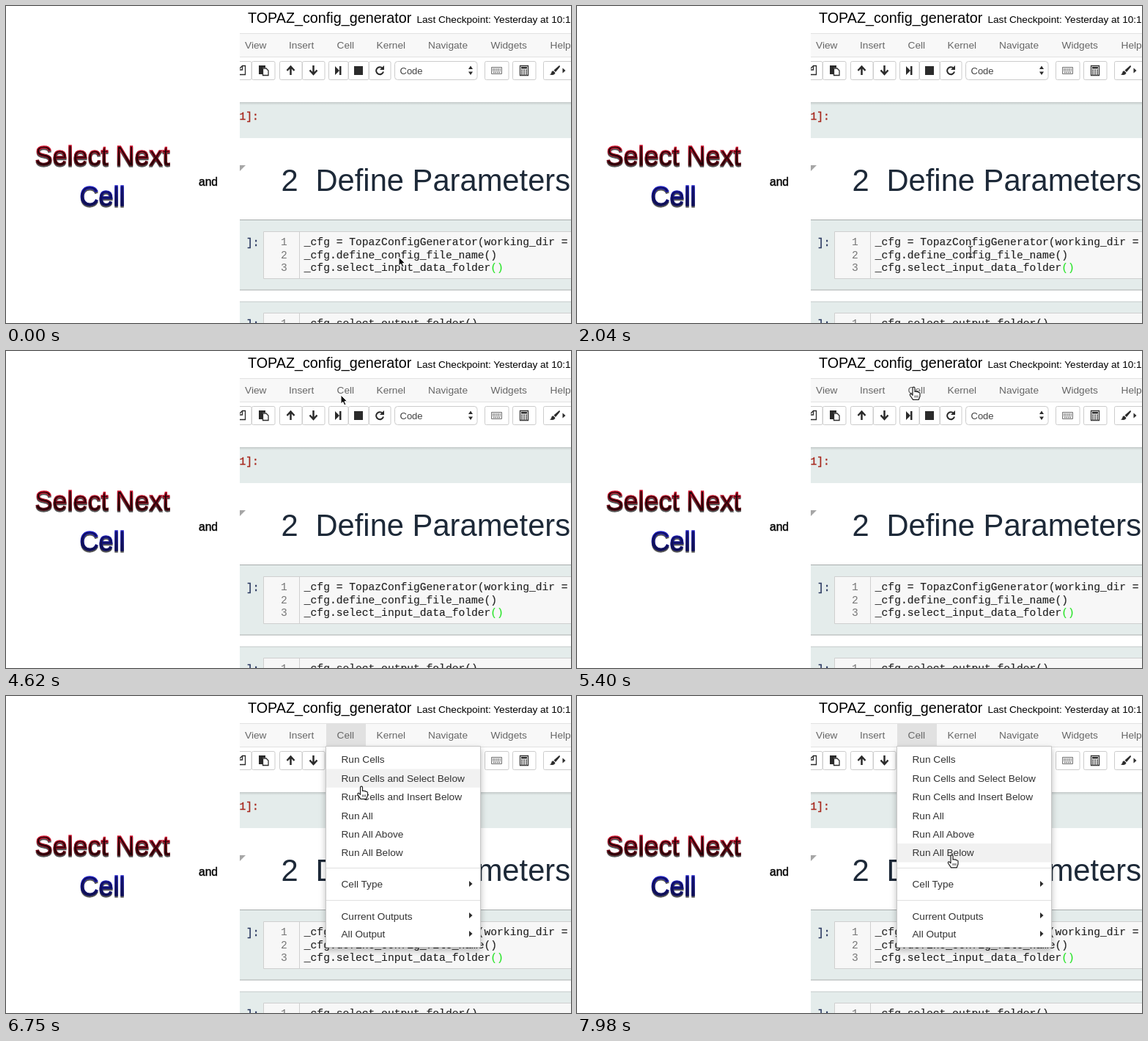
An HTML page for the animation above (8000 ms loop, 771 px wide and 432 px high).

```html
<!DOCTYPE html>
<html lang="en">
<head>
<meta charset="utf-8">
<title>Notebook cell menu</title>
<style>
html, body { margin: 0; width: 100%; height: 100%; overflow: hidden; background: #fff; }
svg { display: block; }
text { font-family: "Liberation Sans", Arial, sans-serif; white-space: pre; }
.mono text { font: 14.64px "Liberation Mono", monospace; fill: #222; stroke: #222; stroke-width: .15; }
.mono .num { fill: #777; stroke: none; }
.mono .red { fill: #a8281e; stroke: #a8281e; stroke-width: .3; }
.mono .prompt { fill: #2a3860; stroke: #2a3860; stroke-width: .4; }
.paren { fill: #2be52b; stroke: #2be52b; }
.bar text { font-size: 13.7px; fill: #666; }
.menu text { font-size: 13.65px; fill: #333; }
.button { fill: #fff; stroke: #ccc; }
.icon { fill: #2b2b2b; }
.line { fill: none; stroke: #2b2b2b; stroke-width: 2; }
.big { font-size: 36px; stroke-width: 1.3; filter: drop-shadow(.5px 2px .6px #000a); }
.pointer { stroke-linejoin: round; }
</style>
</head>
<body>
<svg width="771" height="432" viewBox="0 0 771 432">
  <defs>
    <linearGradient id="shade" x2="0" y2="1">
      <stop stop-color="#c3c9c9"/><stop offset="1" stop-color="#e4eceb"/>
    </linearGradient>
    <linearGradient id="red" x2="0" y2="1">
      <stop offset=".2" stop-color="#d0102c"/><stop offset=".85" stop-color="#400008"/>
    </linearGradient>
    <linearGradient id="blue" x2="0" y2="1">
      <stop offset=".2" stop-color="#1c1cc0"/><stop offset=".85" stop-color="#0c0c58"/>
    </linearGradient>
    <clipPath id="panel"><path d="M319 0H771V432H319Z"/></clipPath>
  </defs>

  <text class="big" x="39.500" y="216.500" fill="#1a0508" stroke="url(#red)">Select Next</text>
  <text class="big" x="100.500" y="271.500" fill="#10104e" stroke="url(#blue)">Cell</text>
  <text x="263" y="245" font-size="15.600" stroke="#000" stroke-width=".4">and</text>

  <g clip-path="url(#panel)">
    <path fill="#e4eceb" d="M319 131H771V180H319ZM319 292H771V387H319ZM319 403H771V432H319Z"/>
    <path fill="url(#shade)" d="M319 131H771V135H319Z"/>
    <path stroke="#a8adad" d="M319 291.500H771M319 387H771"/>
    <path stroke="#c4caca" d="M319 403H771"/>
    <path fill="#f7f7f7" stroke="#cfcfcf" d="M351.500 307.500H775V371.500H351.500ZM351.500 418.500H775V440H351.500Z"/>
    <path stroke="#d0d0d0" d="M400.500 308V371M400.500 419V432"/>
    <text x="330" y="23" font-size="19.750">TOPAZ_config_generator</text>
    <text x="560.500" y="22.500" font-size="13.600">Last Checkpoint: Yesterday at 10:13</text>
    <path fill="#f8f8f8" stroke="#e2e2e2" d="M310 37.500H780V69.500H310Z"/>
    <path id="tab" fill="#e1e1e1" d="M437 38H491V69H437Z"/>
    <g id="bar" class="bar"></g>

    <g id="buttons"></g>
    <g class="icon">
      <path class="line" style="stroke-width:1.300" d="M317 93.500H326.500V81.500H322.500V87H318M322 82L318 86"/>
      <path d="M345 81H354V84H350V93H345Z"/>
      <path fill="#fff" stroke="#2b2b2b" stroke-width="1.300" d="M350.500 85H355L358 88V94.500H350.500Z"/>
      <path class="line" d="M388.500 94V83M383.500 88L388.500 82.500 393.500 88M419.500 81V92M414.500 87.500L419.500 93 424.500 87.500" style="stroke-width:2.500"/>
      <path d="M449 82L455 88 449 94ZM455 82H457.500V94H455ZM475 82H487V94H475Z"/>
      <path class="line" d="M514 85A5 5 0 1 0 515 89.500"/>
      <path d="M516 81V87H510Z"/>
      <path d="M631 86L634 81.500 637 86ZM631 89.500L634 94 637 89.500Z"/>
      <path fill="#eee" stroke="#777" d="M662.500 83.500H676.500V92.500H662.500Z"/>
      <path stroke="#777" stroke-width="1.300" stroke-dasharray="1.500 1" d="M664 86H675M664 88.200H675M665 90.500H674"/>
      <path fill="#fff" stroke="#333" stroke-width="1.300" d="M701.500 81.500H712.500V94.500H701.500Z"/>
      <path d="M703 83H711V85.500H703Z"/>
      <path stroke="#333" stroke-width="1.700" stroke-dasharray="2 1" d="M703 87.500H711M703 90H711M703 92.500H711"/>
      <path d="M755 81Q757 82 755 84L750 90 747.500 87.500ZM747 88.500L749.500 91Q748.500 95 742 93.500 744.500 92 744.500 90T747 88.500ZM759.500 84.500L763.500 88 759.500 91.500Z"/>
    </g>
    <text x="537.500" y="92.500" font-size="13" fill="#444">Code</text>

    <path fill="#a6a6a6" d="M319 217H327L319 225Z"/>
    <g fill="#1d2938" font-size="41.700">
      <text x="375.500" y="251.500">2</text><text x="422.500" y="251.500">Define Parameters</text>
    </g>
    <g class="mono">
      <text class="red" x="318.500" y="154.500">1]:</text>
      <text class="prompt" x="328" y="327">]:</text>
      <text class="prompt" x="328" y="438">]:</text>
      <text class="num" x="375" y="326">1</text>
      <text class="num" x="375" y="343.500">2</text>
      <text class="num" x="375" y="360.500">3</text>
      <text class="num" x="375" y="437">1</text>
      <text x="406.800" y="326">_cfg = TopazConfigGenerator(working_dir = </text>
      <text x="406.800" y="343.500">_cfg.define_config_file_name()</text>
      <text x="406.800" y="360.500">_cfg.select_input_data_folder<tspan class="paren">()</tspan></text>
      <text x="406.800" y="437">_cfg.select_output_folder()</text>
    </g>

    <g id="menu" class="menu">
      <path fill="#fff" stroke="#c6c6c6" style="filter:drop-shadow(0 4px 4px #0004)" d="M436.500 68.500H647.500V342.500H436.500Z"/>
      <path id="row" fill="#f1f1f1" d="M437 0H647V25.400H437Z"/>
      <path stroke="#e0e0e0" d="M437 234.500H647M437 278.500H647"/>
      <path class="icon" d="M632 252L636.500 256 632 260ZM632 295L636.500 299 632 303ZM632 320L636.500 324 632 328Z"/>
    </g>
  </g>

  <g class="pointer">
    <path id="arrow" fill="#111" stroke="#fff" d="M0 0V12L2.800 9.500 4.800 14 7 13 5 8.700H8.700Z"/>
    <g id="beam" fill="none">
      <path stroke="#fff" stroke-width="2.500" opacity=".7" d="M0-6V6"/>
      <path stroke="#222" stroke-width="1.200" d="M-3-7.500Q0-7.500 0-5.500 0-7.500 3-7.500M0-5.500V5.500M-3 7.500Q0 7.500 0 5.500 0 7.500 3 7.500M-1.500 3H1.500"/>
    </g>
    <g id="hand" stroke="#222">
      <path fill="#fff" stroke-width="1.200" d="M-1.500 8.500V.8Q-1.500-.8 0-.8T1.500.8V5.500Q2.800 4.500 4 5.700 5.500 5 6.300 6.500 8.500 6 8.500 8V11.500L6.800 16.300H-1L-5 10.500Q-5.600 8-3.600 8.400L-1.500 10.300Z"/>
      <path d="M1.500 10.500V13.500M3.500 10.500V13.500M5.500 10.500V13.500" stroke-width=".8"/>
    </g>
  </g>
</svg>
<script>
const $ = id => document.getElementById(id);
const add = (parent, markup) => parent.insertAdjacentHTML("beforeend", markup);
const label = (parent, x, y, s) => add(parent, `<text x="${x}" y="${y}">${s}</text>`);

Object.entries({ View: 326, Insert: 386, Cell: 451.5, Kernel: 505.5, Navigate: 576, Widgets: 661.5, Help: 742.5 })
  .forEach(([s, x]) => label($("bar"), x, 58, s));

Object.entries({ "Run Cells": 91, "Run Cells and Select Below": 117, "Run Cells and Insert Below": 142,
  "Run All": 167.5, "Run All Above": 193, "Run All Below": 218, "Cell Type": 261,
  "Current Outputs": 304.5, "All Output": 329 })
  .forEach(([s, y]) => label($("menu"), 457.5, y, s));

// Left edge, width and corner radius of each toolbar button
[[300, 35, 2], [335, 32, 2], [373, 31, 2], [404, 31, 2], [440, 27, 2], [467, 28, 2], [495, 30, 2],
 [530, 113, 4], [653, 33, 2], [691, 32, 2], [733, 50, 2]].forEach(([x, w, r]) =>
  add($("buttons"), `<rect class="button" x="${x + .5}" y="75.5" width="${w - .5}" height="25" rx="${r}"/>`));

const LOOP = 8000, OPEN = 5700, ROW = 25.4, TOP = 74;
// Pointer path: time, x, y
const path = [[0, 536, 342], [700, 536, 342], [1000, 537, 335], [2200, 537, 335], [3300, 513, 208],
  [3600, 513, 208], [4400, 457, 60], [4800, 457, 60], [5200, 459.5, 50], [5700, 459.5, 50],
  [6500, 485, 124], [6900, 485, 124], [7800, 511.5, 217.5], [LOOP, 511.5, 217.5]];

function pointerAt(t) {
  const i = path.findIndex(k => k[0] > t), [t0, x0, y0] = path[i - 1], [t1, x1, y1] = path[i];
  const u = (t - t0) / (t1 - t0), e = u * u * (3 - 2 * u);
  return [x0 + (x1 - x0) * e, y0 + (y1 - y0) * e];
}

const show = (id, on) => $(id).style.display = on ? "" : "none";

function draw(t) {
  const [x, y] = pointerAt(t), open = t >= OPEN, row = Math.floor((y - TOP) / ROW);
  const kind = t >= 5000 ? "hand" : t >= 900 && y > 131 ? "beam" : "arrow";
  for (const id of ["arrow", "beam", "hand"]) show(id, id === kind);
  $(kind).setAttribute("transform", `translate(${x} ${y})`);
  show("menu", open);
  show("tab", open);
  show("row", row >= 0 && row < 6);
  $("row").setAttribute("transform", `translate(0 ${TOP + row * ROW})`);
}

const start = performance.now();
function tick() {
  draw((performance.now() - start) % LOOP);
  requestAnimationFrame(tick);
}
tick();
</script>
</body>
</html>
```
